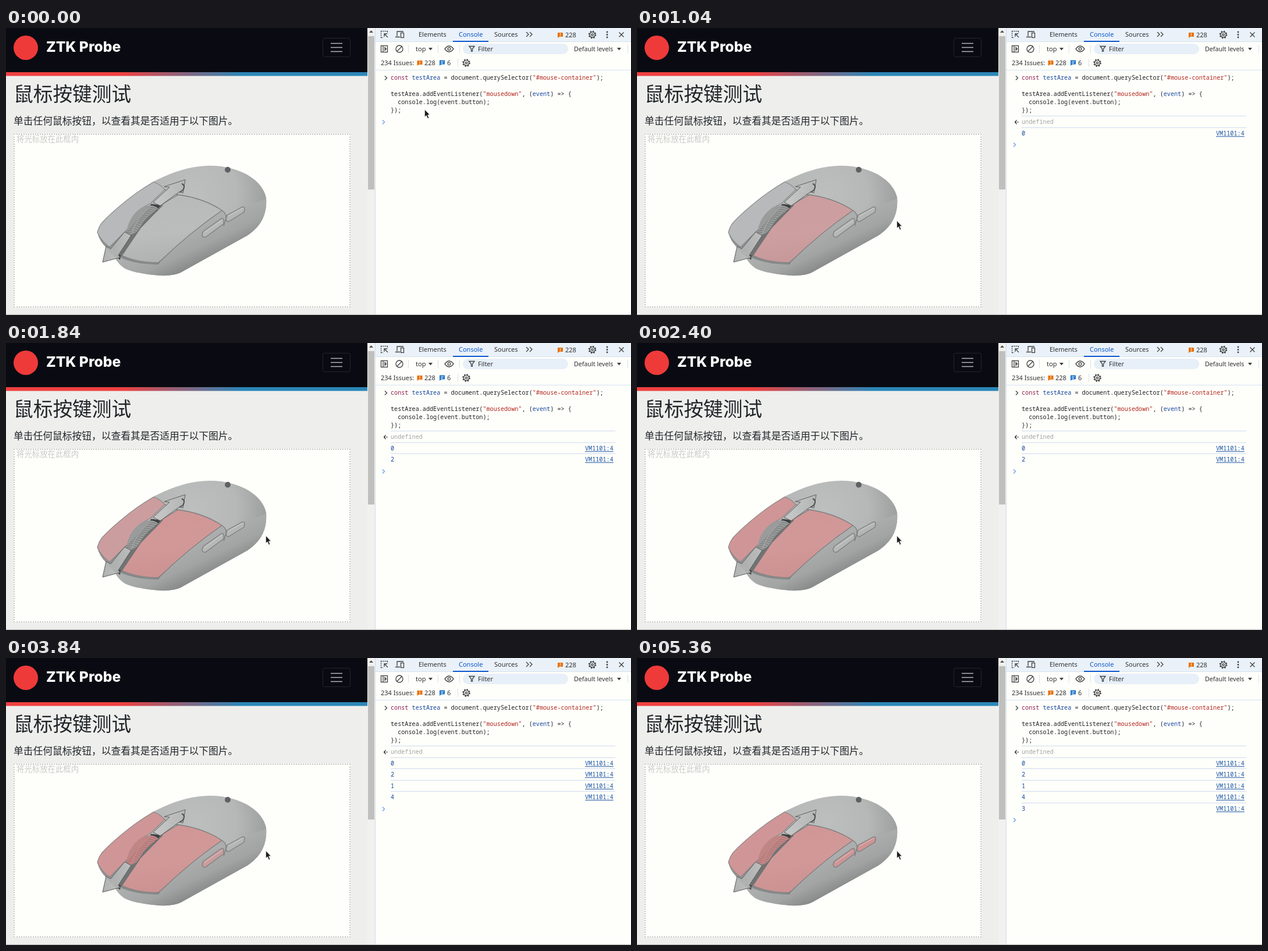
Recreate the animation shown at these times as an HTML page. Size 1074 by 494 pixels, loop 5440 ms.

```html
<!DOCTYPE html>
<html lang="zh">
<head>
<meta charset="utf-8">
<title>Mouse button test</title>
<style>
html, body { margin: 0; width: 100%; height: 100%; overflow: hidden; background: #fefefa; }
svg { display: block; width: 1074px; height: 494px; }
text { white-space: pre; }
.cjk { font-family: "Noto Sans CJK SC", "Noto Sans CJK", sans-serif; fill: #212529; }
.ui { font: 11px "Noto Sans", sans-serif; fill: #303134; }
.mono { font: 10.17px "Noto Sans Mono", monospace; fill: #202124; }
.kw { fill: #8e1a50; } .def { fill: #17479e; } .str { fill: #b3261e; }
.ico { fill: none; stroke: #404142; stroke-width: 1.3; }
.edge { fill: none; stroke: #7b7d7d; stroke-width: 1.3; stroke-linejoin: round; }
.pink { fill: #ed6a6c; opacity: 0; }
.drop { box-sizing: border-box; height: 100%; border: 2px dotted #c8c8c6; background: #fefefa; }
</style>
</head>
<body>
<svg viewBox="0 0 1074 494" xmlns="http://www.w3.org/2000/svg">
<defs>
  <linearGradient id="bar"><stop offset=".32" stop-color="#ef4040"/><stop offset=".65" stop-color="#2b86b7"/></linearGradient>
  <radialGradient id="body" gradientUnits="userSpaceOnUse" cx="325" cy="285" r="145">
    <stop offset="0" stop-color="#bdbfbf"/><stop offset=".5" stop-color="#b6b8b8"/><stop offset="1" stop-color="#939595"/>
  </radialGradient>
  <linearGradient id="side" gradientUnits="userSpaceOnUse" x1="335" y1="340" x2="362" y2="398">
    <stop offset="0" stop-color="#acaeae"/><stop offset=".5" stop-color="#a2a4a4"/><stop offset="1" stop-color="#838585"/>
  </linearGradient>
  <linearGradient id="top" gradientUnits="userSpaceOnUse" x1="250" y1="270" x2="270" y2="410">
    <stop offset="0" stop-color="#b7b9b9"/><stop offset=".6" stop-color="#bbbdbd"/><stop offset="1" stop-color="#aeb0b0"/>
  </linearGradient>
  <linearGradient id="metal"><stop offset="0" stop-color="#a9abaa"/><stop offset=".5" stop-color="#cfd0cf"/><stop offset="1" stop-color="#b4b6b5"/></linearGradient>
  <path id="shell" d="M157 352Q159 343 165 335Q178 321 196 306Q224 282 252 265C290 246 316 238 350 237C402 237 441 262 447 292C449 320 439 341 415 357L300 421Q288 427 264 426Q218 422 203 413Q192 405 188 396L172 378Q160 366 157 352Z"/>
  <path id="main" d="M296 287Q340 293 371 314Q316 352 262 404Q222 404 194 389Q212 359 228 342Q250 312 296 287Z"/>
  <path id="second" d="M157 352Q159 343 165 335Q178 321 196 306Q224 282 254 265Q265 269 273 278L248 302Q218 315 209 346L178 377Q164 367 157 352Z"/>
  <path id="wheel" d="M207 352Q210 325 233 309Q252 301 262 311Q240 325 231 342Q224 355 213 356Z"/>
  <path id="back" d="M339 350L370 328Q374 327 374 331V337L343 360Q337 361 337 355Z"/>
  <path id="front" d="M380 322L406 308Q411 307 410 312L409 317L383 333Q378 334 378 328Z"/>
  <path id="arrows" d="M166 403L172 376L180 380L204 351L215 357L193 391L196 395ZM308 261L304 284L298 282L265 306L253 300L281 274L272 273Z"/>
  <clipPath id="shellClip"><use href="#shell"/></clipPath>
  <clipPath id="wheelClip"><use href="#wheel"/></clipPath>
  <g id="gear" class="ico"><circle r="4.6"/><circle r="1.7"/><circle r="5.8" stroke-width="2" stroke-dasharray="2.3 2.25"/></g>
  <g id="issue"><path d="M-4.5-4h9v7h-6l-3 2z" fill="#e8710a"/><path d="M0-2.8v2.6M0 .8v1.2" stroke="#fff" stroke-width="1.2"/></g>
</defs>

<!-- web page -->
<rect width="621" height="494" fill="#eeeeec"/>
<rect width="621" height="76" fill="#0a0b12"/>
<rect y="76" width="621" height="6.5" fill="url(#bar)"/>
<circle cx="34" cy="34" r="21" fill="#ef3a3a"/>
<text x="69" y="40.5" font-family="Inter, sans-serif" font-size="24.6" font-weight="800" fill="#fff">ZTK Probe</text>
<rect x="544.5" y="17.5" width="47" height="32" rx="3" fill="none" stroke="#24262c"/>
<path d="M558 26.5h20M558 33.5h20M558 40.5h20" stroke="#b4b4b7" stroke-width="1.3"/>
<text class="cjk" x="13" y="126.2" font-size="33.7">鼠标按键测试</text>
<text class="cjk" x="13" y="166" font-size="16.76">单击任何鼠标按钮，以查看其是否适用于以下图片。</text>
<foreignObject x="13" y="182" width="579" height="299"><div xmlns="http://www.w3.org/1999/xhtml" class="drop"></div></foreignObject>
<text class="cjk" x="18" y="196.3" font-size="13.4" style="fill:#c9c9c7">将光标放在此框内</text>

<!-- mouse -->
<use href="#shell" fill="url(#body)"/>
<path d="M371 314Q379 318 380 325Q420 303 450 293V430H188L190 393Q222 408 262 406Q315 354 371 314Z" fill="url(#side)" clip-path="url(#shellClip)"/>
<circle cx="381" cy="244" r="5" fill="#5f6163"/>
<use href="#second" fill="#b8b9bb"/>
<use href="#main" fill="url(#top)"/>
<use href="#second" class="pink" id="p2"/>
<use href="#main" class="pink" id="p0"/>
<use href="#second" class="edge" stroke-opacity=".7"/>
<use href="#main" class="edge"/>
<path d="M273 278Q285 287 296 287M371 314Q379 319 378 328L374 341M194 391Q222 407 262 406L264 401" class="edge"/>
<path d="M190 394L183 380L209 349L250 303L270 305L232 344L199 393Z" fill="#717373"/>
<path d="M249 303L266 305L258 315L247 310ZM185 390L197 391L196 399Z" fill="#3d3f40"/>
<use href="#wheel" fill="#9a9b9b"/>
<g id="ribs" clip-path="url(#wheelClip)" stroke="#767878" fill="none"></g>
<use href="#wheel" class="pink" id="p1"/>
<use href="#arrows" fill="url(#metal)" opacity=".92"/>
<use href="#arrows" fill="none" stroke="#5c5e5e"/>
<path d="M302 268Q309 271 304 279L298 283" fill="none" stroke="#505252" stroke-width="2"/>
<use href="#back" fill="#b6b8b8"/><use href="#front" fill="#b4b6b6"/>
<use href="#back" class="pink" id="p4"/><use href="#front" class="pink" id="p3"/>
<use href="#back" class="edge"/><use href="#front" class="edge"/>
<path d="M341 352L371 331M382 324L407 310" fill="none" stroke="#e0e1e1" opacity=".6"/>

<!-- scrollbar -->
<rect x="621" width="13" height="494" fill="#f1f1ef"/>
<rect x="622" y="14" width="11" height="264" fill="#bfbfbd"/>
<path d="M624 8l3.5-4 3.5 4z" fill="#505050"/>

<!-- developer tools -->
<rect x="634" width="440" height="494" fill="#fefefa"/>
<rect x="635" width="439" height="23" fill="#eaf1f8"/>
<path d="M634.5 0V494" stroke="#cfdcec"/>
<path d="M635 23.5h439M635 72.5h439" stroke="#d5e2f3"/>
<path d="M644 5.5h11M644.5 5v11M655.5 5v4M644 16.5h4" class="ico" stroke-dasharray="2 1.3"/>
<path d="M650 10l6 6M650 15v-5h5" class="ico"/>
<path d="M672 14V6h11M669 15.5h8" class="ico"/><rect x="678.5" y="8.5" width="5" height="8" class="ico"/>
<text class="ui" x="709" y="15">Elements</text>
<text class="ui" x="778" y="15" style="fill:#0b57d0">Console</text>
<rect x="768" y="22" width="61" height="2" fill="#0b57d0"/>
<text class="ui" x="839" y="15">Sources</text>
<path d="M894 7l4 4-4 4M900 7l4 4-4 4" class="ico"/>
<use href="#issue" x="952.5" y="12"/>
<text class="ui" x="961" y="16">228</text>
<use href="#gear" x="1007.5" y="11.5"/>
<g fill="#404142"><circle cx="1033" cy="7" r="1.4"/><circle cx="1033" cy="11.5" r="1.4"/><circle cx="1033" cy="16" r="1.4"/></g>
<path d="M1053.5 7.5l8 8M1061.5 7.5l-8 8" class="ico"/>
<rect x="644.5" y="30.5" width="11" height="11" class="ico"/><path d="M648 31v10M651 33.5l2.5 2.5-2.5 2.5z" class="ico"/>
<circle cx="676" cy="36" r="6" class="ico"/><path d="M680 32l-8 8" class="ico"/>
<path d="M691.5 29v14M742.5 29v14M779.5 29v14M1068.5 29v14M776.5 53v14" stroke="#d5e2f3"/>
<text class="ui" x="704" y="40">top</text>
<path d="M726 34h7l-3.5 4.5zM1050 34h7l-3.5 4.5z" fill="#404142"/>
<path d="M754 36Q761.5 26 769 36Q761.5 46 754 36Z" class="ico"/><circle cx="761.5" cy="36" r="2.3" class="ico"/>
<rect x="785" y="27" width="181" height="18" rx="9" fill="#e7eff8"/>
<path d="M796 31.5h9l-3.5 4.5v4h-2v-4z" class="ico"/>
<text class="ui" x="811" y="40">Filter</text>
<text class="ui" x="976" y="40" style="font-size:10.7px">Default levels</text>
<text class="ui" x="644" y="64">234 Issues:</text>
<use href="#issue" x="711" y="60"/>
<text class="ui" x="719" y="64">228</text>
<path d="M745 55.5h9v7h-6l-3 2.5z" fill="#1a73c8"/><path d="M747 58h5M747 60.5h4" stroke="#fff"/>
<text class="ui" x="758" y="64">6</text>
<use href="#gear" x="791" y="60"/>
<path d="M651 82.5l3.5 3.5-3.5 3.5" class="ico"/>
<g class="mono">
  <text x="661" y="89.3"><tspan class="kw">const</tspan> <tspan class="def">testArea</tspan> = document.querySelector(<tspan class="str">"#mouse-container"</tspan>);</text>
  <text x="661" y="117.3">testArea.addEventListener(<tspan class="str">"mousedown"</tspan>, (<tspan class="def">event</tspan>) =&gt; {</text>
  <text x="661" y="131.3">  console.log(event.button);</text>
  <text x="661" y="145.3">});</text>
</g>
<g id="log"></g>
<g id="prompt"><path d="M647 158.5l3.5 3.5-3.5 3.5" fill="none" stroke="#6a9cec" stroke-width="1.3"/><path id="caret" d="M659.5 157v13" stroke="#303134"/></g>
<path d="M0 493.5H1074" stroke="#b4b4b2"/>
<path id="cursor" d="M0 0V13.5L3 10.7L5.3 16L7.7 15L5.4 9.7H9.3Z" fill="#1c1c1c" stroke="#fff" stroke-width=".9"/>
</svg>
<script>
const LOOP = 5440, ROW = 19.55, FADE = 200, ENTER = 120;
const presses = [[0, 880], [2, 1680], [1, 2640], [4, 3680], [3, 4680]];
const $ = id => document.getElementById(id);
const clamp = v => Math.max(0, Math.min(1, v));
const ease = v => v * v * (3 - 2 * v);

// wheel tread
let ribs = "";
for (let i = 0; i < 17; i++) {
  ribs += `<path d="M${250 - i * 3} ${303 + i * 3.3}q10 -3 20 5"/>`;
}
$("ribs").innerHTML = ribs + '<path d="M216 354Q223 327 250 306" stroke="#b2b3b3"/>';

// one console row with its separator on top
function row(k, inner) {
  const y = Math.round(ROW * k);
  return `<g visibility="hidden" transform="translate(0 ${y})">
    <path d="M661 151.5H1047" stroke="#cfdcf2"/>${inner}</g>`;
}
const reply = `<path d="M652.5 158.5l-3 3.5 3 3.5M650 162h2" class="ico"/><circle cx="654.5" cy="162" r="1" fill="#404142"/>
  <text class="mono" x="661" y="165.3" style="fill:#a4a4a2">undefined</text>`;
const entry = n => `<text class="mono" x="661" y="165.3" style="fill:#17479e">${n}</text>
  <text class="mono" x="995" y="165.3" style="fill:#1d56a5" text-decoration="underline">VM1101:4</text>`;
$("log").innerHTML = row(0, reply) + presses.map(([n], i) => row(i + 1, entry(n))).join("");
const rows = [...$("log").children];
const times = [ENTER, ...presses.map(p => p[1])];

function draw(t) {
  const shown = times.filter(s => t >= s).length;
  rows.forEach((r, i) => r.setAttribute("visibility", i < shown ? "visible" : "hidden"));
  $("prompt").setAttribute("transform", `translate(0 ${Math.round(ROW * shown)})`);
  $("caret").setAttribute("visibility", shown === 1 ? "visible" : "hidden");
  for (const [n, at] of presses) $("p" + n).style.opacity = 0.45 * clamp((t - at) / FADE);
  const k = ease(clamp((t - 80) / 480));
  $("cursor").setAttribute("transform", `translate(${719.3 - 273 * k} ${140 + 191.5 * k})`);
}

const start = performance.now();
function tick() {
  draw((performance.now() - start) % LOOP);
  requestAnimationFrame(tick);
}
tick();
</script>
</body>
</html>
```
